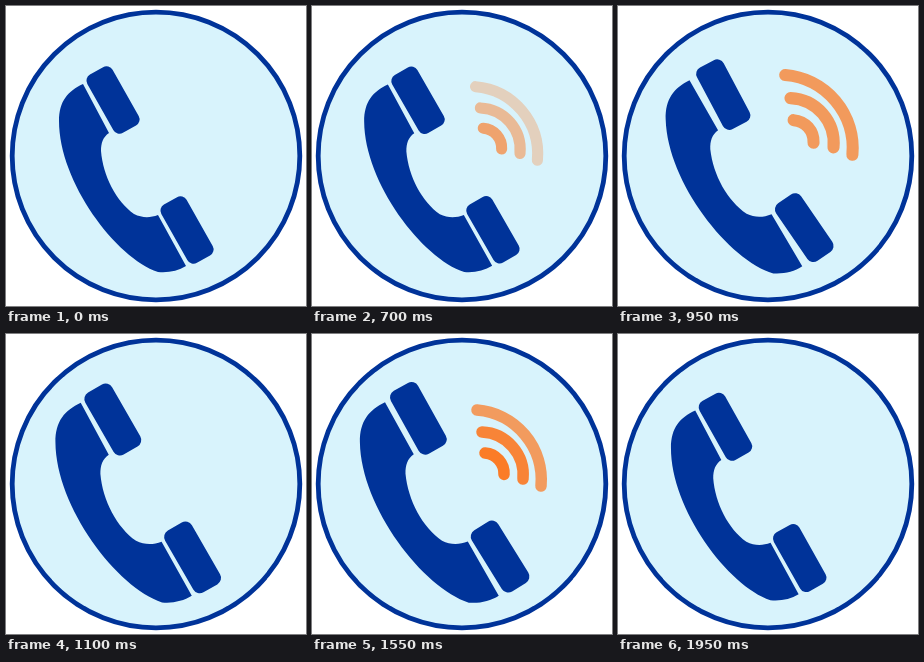
Write an HTML page that moves like this. It is 300 px wide and 300 px high and loops after 2000 ms.

```html
<!DOCTYPE html>
<html lang="en">
<head>
<meta charset="utf-8">
<title>Ringing phone</title>
<style>
  html, body { margin: 0; width: 100%; height: 100%; overflow: hidden; background: #fff; }
  svg { display: block; width: 100vw; height: 100vh; }
</style>
</head>
<body>
<svg viewBox="0 0 300 300">
  <circle cx="150" cy="150" r="143.8" fill="#d8f3fc" stroke="#039" stroke-width="4.8"/>
  <g id="waves" fill="none" stroke="#fb7c27" stroke-width="11.5" stroke-linecap="round">
    <path d="M173 119A20.5 20.5 0 0 1 192 140.5"/>
    <path d="M170 98A43 43 0 0 1 211 145"/>
    <path d="M165 76A70 70 0 0 1 229 152"/>
  </g>
  <g id="phone" fill="#039">
    <path d="M77 78L103 127C97 131 95 137 95 145C97 170 110 195 128 208C136 212 144 212 152 209L180 260C172 265 162 267 152 266C110 252 53 176 53 115C53 95 62 85 77 78Z"/>
    <rect id="ear" x="-14.5" y="-33.5" width="29" height="67" rx="7"/>
    <rect id="mouth" x="-14.5" y="-33.5" width="29" height="67" rx="7"/>
  </g>
</svg>
<script>
const LOOP = 2000, STEP = 50, RING_START = 550;
const PULSES = [550, 1300], PULSE_LENGTH = 550;
const TILT = -29.5;

const [waves, phone, ear, mouth] =
  ['waves', 'phone', 'ear', 'mouth'].map(id => document.getElementById(id));
const clamp = v => Math.max(0, Math.min(1, v));
const move = (el, transform) => el.setAttribute('transform', transform);
const scaleAbout = (x, y, s) => `translate(${x} ${y}) scale(${s}) translate(${-x} ${-y})`;

function placeCap(el, x, y, flare, turn) {
  move(el, `translate(${x} ${y}) rotate(${TILT}) translate(${2.5 * flare} 0) rotate(${turn * flare})`);
}

function drawPhone(t) {
  const ringing = t >= RING_START;
  const swing = Math.cos(2 * Math.PI * (t - 500) / 800);
  const angle = ringing ? 1.4 * swing - 0.4 : 0;
  const flare = ringing ? Math.max(0, -swing) : 0;
  const growth = 0.106 * clamp(1 - Math.abs(t - 1350) / 650);
  move(phone, `${scaleAbout(94, 229, 1 + growth)} rotate(${angle} 150 235)`);
  placeCap(ear, 107, 94, flare, 3.5);
  placeCap(mouth, 181, 224, flare, -3.5);
}

// The arcs appear from the inside out, drift outward and fade together.
function drawWaves(t) {
  const start = PULSES.find(s => t >= s && t < s + PULSE_LENGTH) ?? t;
  const age = t - start;
  const drift = (age - 250) / 150;
  move(waves, `translate(${2.2 * drift} ${-3.5 * drift}) ${scaleAbout(165, 146, 1 + 0.05 * drift)}`);
  const fade = clamp((PULSE_LENGTH - age) / 200);
  [...waves.children].forEach((arc, i) =>
    arc.setAttribute('opacity', fade * clamp((age - 42 * i) / 225)));
}

const begin = performance.now();
function tick() {
  const now = performance.now() - begin;
  const t = Math.floor((now % LOOP) / STEP) * STEP;
  drawPhone(t);
  drawWaves(t);
  requestAnimationFrame(tick);
}
tick();
</script>
</body>
</html>
```
